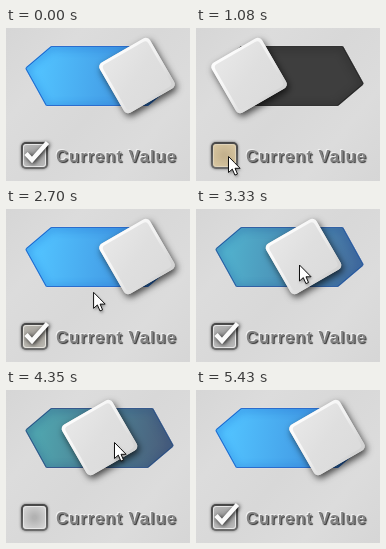
These frames come from a looping animation (184x153 px, 6.09 s). An HTML page with a canvas:

```html
<!DOCTYPE html>
<html lang="en">
<head>
<meta charset="utf-8">
<title>Toggle slider</title>
<style>
  html, body { margin: 0; width: 100%; height: 100%; overflow: hidden; background: #d9d9d9; }
  canvas { position: absolute; left: 0; top: 0; }
  #label {
    position: absolute; left: 50px; top: 120px; white-space: nowrap;
    font: bold 17px/17px "Liberation Sans", Arial, sans-serif; letter-spacing: .8px;
    color: #808080; text-shadow: -1px -1px 0 #f0f0f0, 1px 1px 1px #333;
  }
</style>
</head>
<body>
<canvas id="stage" width="184" height="153"></canvas>
<div id="label">Current Value</div>
<script>
const ctx = document.getElementById('stage').getContext('2d');
const LOOP = 6090, STEP = 30;
const OFF_X = 53, ON_X = 131, KNOB_Y = 47.5;

const TRACK = [[19, 40], [45, 18], [147, 18], [168, 56], [142, 78], [40, 78]];
const ARROW = [[0, 0], [0, 16], [3.8, 12.6], [6.4, 18.6], [9, 17.5], [6.5, 11.8], [11.6, 11.8]];
const LEFT_COLORS = [[62, 62, 62], [80, 165, 172], [82, 195, 255]];
const RIGHT_COLORS = [[62, 62, 62], [75, 93, 120], [60, 135, 215]];
const EDGE_COLORS = [[30, 30, 30], [35, 72, 125], [22, 95, 200]];

const clamp = v => Math.max(0, Math.min(1, v));
const lerp = (a, b, k) => a + (b - a) * k;
const progress = (t, from, to) => clamp((t - from) / (to - from));
const smooth = k => k * k * (3 - 2 * k);
const easeOut = k => 1 - (1 - k) ** 2;

// Keys are [time, value..., easing towards this key].
function follow(keys, t) {
  let i = 1;
  while (i < keys.length - 1 && t > keys[i][0]) i++;
  const [t0, ...a] = keys[i - 1], [t1, ...b] = keys[i];
  const ease = b.find(v => typeof v === 'function') || (k => k);
  const k = ease(progress(t, t0, t1));
  return a.filter(Number.isFinite).map((v, n) => lerp(v, b[n], k));
}

const KNOB = [
  [0, ON_X], [780, ON_X], [1080, OFF_X, smooth], [1830, OFF_X], [2130, ON_X, smooth],
  [3030, ON_X], [3330, 107.5], [3660, 73], [3810, OFF_X, easeOut],
  [3930, OFF_X], [4350, 93.5], [4560, 112], [4640, 112], [4890, ON_X, easeOut], [LOOP, ON_X]
];
const POINTER = [
  [100, 178, 58], [700, 32.5, 128.5, easeOut], [2550, 32.5, 128.5], [2820, 127, 51, smooth],
  [3030, 127, 51], [3330, 103.5, 56], [3660, 68, 57], [3930, 68, 57],
  [4350, 108.5, 52.5], [4560, 127, 49.5], [5340, 127, 49.5], [5430, 186, 50]
];

const rgb = c => `rgb(${c.map(Math.round)})`;
function colorAt(colors, p) {
  const i = p < .5 ? 0 : 1, k = p * 2 - i;
  return rgb(colors[i].map((v, n) => lerp(v, colors[i + 1][n], k)));
}

function gradient(x0, y0, x1, y1, ...colors) {
  const g = ctx.createLinearGradient(x0, y0, x1, y1);
  colors.forEach((c, i) => g.addColorStop(i / (colors.length - 1), c));
  return g;
}

function shadow(color, blur, x = 0, y = 0) {
  Object.assign(ctx, { shadowColor: color, shadowBlur: blur, shadowOffsetX: x, shadowOffsetY: y });
}

function polygon(points, radius = 0) {
  const path = new Path2D();
  const [last, first] = [points[points.length - 1], points[0]];
  path.moveTo((last[0] + first[0]) / 2, (last[1] + first[1]) / 2);
  points.forEach((p, i) => path.arcTo(...p, ...points[(i + 1) % points.length], radius));
  path.closePath();
  return path;
}

function box(x, y, size, radius) {
  const path = new Path2D();
  path.roundRect(x, y, size, size, radius);
  return path;
}

const trackPath = polygon(TRACK, 2), arrowPath = polygon(ARROW);

function scoped(draw) {
  ctx.save();
  draw();
  ctx.restore();
}

function drawBackground() {
  ctx.fillStyle = gradient(0, 0, 184, 153, '#d6d6d6', '#dcdcdc', '#d8d8d8', '#dcdcdc', '#d6d6d6');
  ctx.fillRect(0, 0, 184, 153);
}

function drawTrack(p) {
  const edge = colorAt(EDGE_COLORS, p);
  ctx.fillStyle = gradient(30, 40, 160, 56, colorAt(LEFT_COLORS, p), colorAt(RIGHT_COLORS, p));
  ctx.fill(trackPath);
  scoped(() => {
    ctx.clip(trackPath);
    shadow(edge, 8, 0, 1);
    ctx.strokeStyle = edge;
    ctx.lineWidth = 2;
    ctx.stroke(trackPath);
  });
  ctx.strokeStyle = 'rgba(255,255,255,.3)';
  ctx.lineWidth = .6;
  ctx.stroke(trackPath);
}

function drawKnob(x) {
  scoped(() => {
    ctx.translate(x, KNOB_Y);
    ctx.rotate(-Math.PI / 6);
    const body = box(-29, -29, 58, 5);
    scoped(() => {
      shadow('rgba(0,0,0,.7)', 7, 2, 3);
      ctx.fillStyle = '#d0d0d0';
      ctx.fill(body);
    });
    ctx.fillStyle = gradient(-10, -29, 10, 29, '#fcfcfc', '#f0f0f0', '#d4d4d4');
    ctx.fill(body);
    ctx.fillStyle = gradient(-12, -26, 12, 26, '#e6e6e6', '#dfdfdf', '#dcdcdc');
    ctx.fill(box(-26, -26, 52, 4));
  });
}

function drawCheckbox(checked, hover) {
  const tint = (plain, warm) => rgb(plain.map((v, i) => lerp(v, warm[i], hover)));
  scoped(() => {
    shadow('rgba(0,0,0,.5)', 3);
    ctx.fillStyle = gradient(0, 114, 0, 141, '#484848', '#6c6c6c');
    ctx.fill(box(15, 114, 27, 5));
  });
  const face = ctx.createRadialGradient(28.5, 127.5, 2, 28.5, 127.5, 14);
  face.addColorStop(0, tint([178, 178, 178], [196, 178, 142]));
  face.addColorStop(1, tint([214, 214, 214], [216, 198, 160]));
  ctx.fillStyle = face;
  ctx.fill(box(17, 116, 23, 3));
  ctx.strokeStyle = tint([232, 232, 232], [224, 212, 186]);
  ctx.lineWidth = 1;
  ctx.stroke(box(17.5, 116.5, 22, 3));
  if (!checked) return;
  scoped(() => {
    ctx.globalAlpha = checked;
    ctx.fillStyle = 'rgba(40,40,40,.15)';
    ctx.fill(box(18, 117, 21, 2));
    shadow('rgba(0,0,0,.8)', 4, 1, 1);
    ctx.strokeStyle = '#fafafa';
    ctx.lineWidth = 4.5;
    ctx.stroke(new Path2D('M20 125.5L26 132L41.5 114.5'));
  });
}

function drawPointer(x, y) {
  scoped(() => {
    ctx.translate(x, y);
    scoped(() => {
      shadow('rgba(0,0,0,.4)', 3, 1, 2);
      ctx.fillStyle = '#fff';
      ctx.fill(arrowPath);
    });
    ctx.strokeStyle = '#111';
    ctx.lineWidth = 1;
    ctx.stroke(arrowPath);
  });
}

function render(t) {
  const [knobX] = follow(KNOB, t);
  const checked = clamp(1 - progress(t, 750, 930) + progress(t, 1770, 1950)
    - progress(t, 3660, 3810) + progress(t, 4640, 4830));
  const hover = progress(t, 510, 690) - progress(t, 2580, 2730);
  drawBackground();
  drawTrack((knobX - OFF_X) / (ON_X - OFF_X));
  drawKnob(knobX);
  drawCheckbox(checked, hover);
  if (t >= 120 && t < 5430) drawPointer(...follow(POINTER, t));
}

const start = performance.now();
function tick() {
  const t = (performance.now() - start) % LOOP;
  render(Math.floor(t / STEP) * STEP);
  requestAnimationFrame(tick);
}
tick();
</script>
</body>
</html>
```
